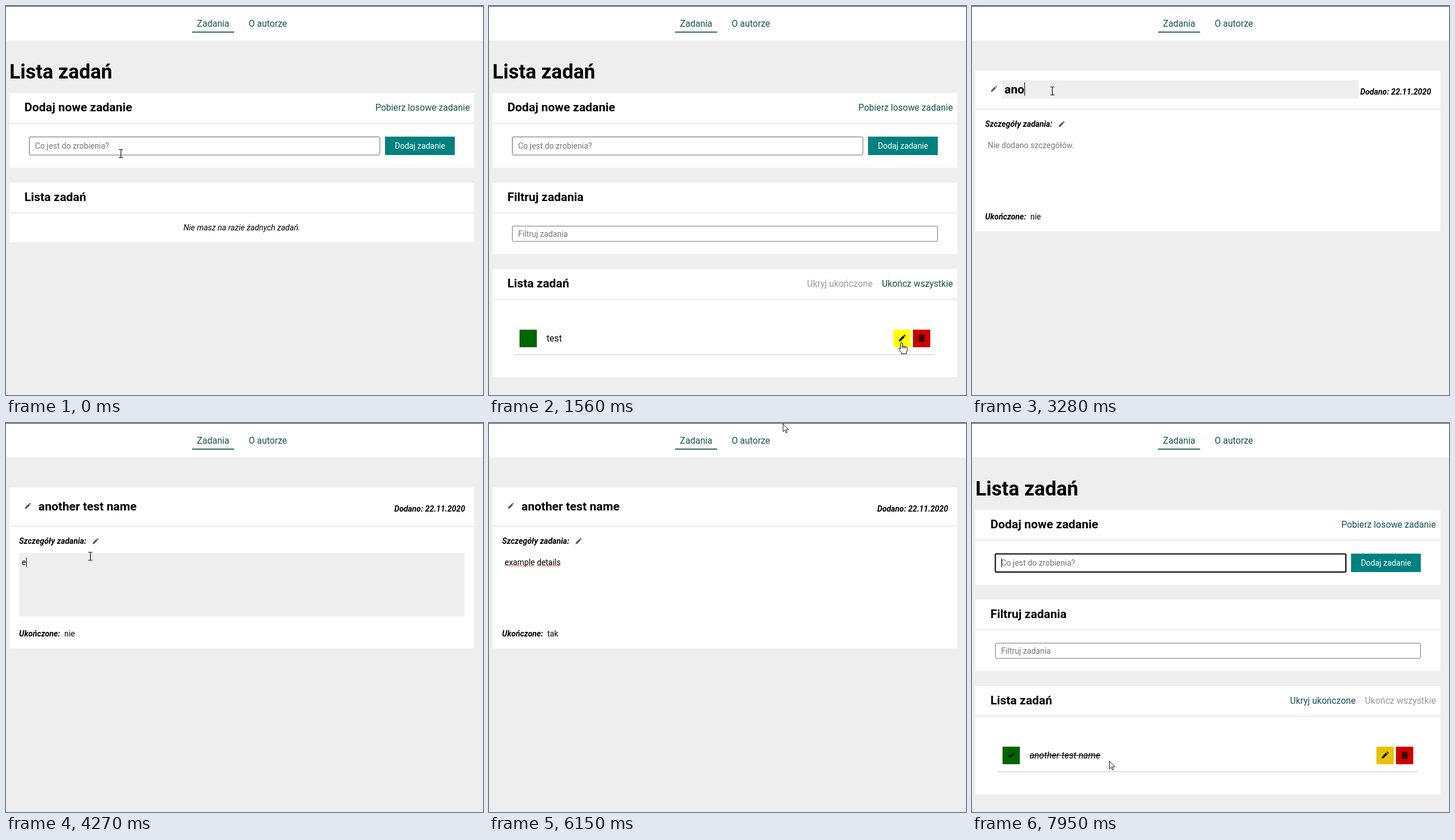
An HTML page for the animation above (8 s loop, 828 px wide and 676 px high).

```html
<!DOCTYPE html>
<html lang="pl">
<head>
<meta charset="utf-8">
<title>Lista zadań</title>
<style>
html, body { margin: 0; width: 100%; height: 100%; overflow: hidden; background: #eee; }
svg { display: block; width: 100vw; height: 100vh; font-family: Roboto, Arial, sans-serif; font-size: 13.87px; }
.h1 { font-size: 34.67px; font-weight: 700; }
.h2 { font-size: 20.8px; font-weight: 700; }
.link { font-size: 15.6px; fill: #14504f; }
.off { fill: #999; }
.item { font-size: 15.6px; }
.hint { fill: #757575; }
.label { font-weight: 700; font-style: italic; }
.end { text-anchor: end; }
.it { font-style: italic; }
</style>
</head>
<body>
<svg id="stage" viewBox="0 0 828 676" xmlns="http://www.w3.org/2000/svg"></svg>
<script>
const LOOP = 8000;
const stage = document.getElementById('stage');

const box = (x, y, x2, y2, fill = '#fff', extra = '') =>
  `<rect x="${x}" y="${y}" width="${x2 - x}" height="${y2 - y}" fill="${fill}" ${extra}/>`;
const text = (x, y, cls, str, id = '') =>
  `<text x="${x}" y="${y}" class="${cls}" ${id && `id="${id}"`}>${str}</text>`;
const group = (id, body) => `<g id="${id}">${body}</g>`;
const at = (x, y, body) => `<g transform="translate(${x} ${y})">${body}</g>`;
const panel = (top, split, bottom) => box(6, top, 813, split) + box(6, split + 2.5, 813, bottom);

const pencil = fill => `<path fill="${fill}" d="M-5.7 5.7L-4.9 2.3L1.9-4.5L4.5-1.9L-2.3 4.9Z
  M2.7-5.3L3.5-6.1Q4.1-6.6 4.7-6L6-4.7Q6.6-4.1 6.1-3.5L5.3-2.7Z"/>`;
const trash = `<path d="M-5.5-4.8H-2V-6.2H2V-4.8H5.5V-3H-5.5ZM-4.6-2.2H4.6V6.2H-4.6Z"/>
  <path d="M-2.2-.8V4.8M0-.8V4.8M2.2-.8V4.8" stroke="#c00" stroke-width=".9"/>`;
const check = '<path d="M-5.3 0L-1.8 3.4L5.4-3.7" fill="none" stroke="#000" stroke-width="2.3"/>';

const wave = (x, x2) => {
  let d = `M${x} 249`;
  for (let i = 1; x + i * 2 <= x2; i++) d += `L${x + i * 2} ${i % 2 ? 247.3 : 249}`;
  return `<path d="${d}" fill="none" stroke="#e22" stroke-width=".9"/>`;
};

const cursors = {
  I: '<path d="M-3.5-7H-1Q0-7 0-6Q0-7 1-7H3.5M0-6V6M-3.5 7H-1Q0 7 0 6Q0 7 1 7H3.5" fill="none" stroke="#000" stroke-width="1.1"/>',
  A: '<path d="M.5.5V14L3.6 11.2L5.7 16L7.7 15.1L5.6 10.4H10Z" fill="#fff" stroke="#000" stroke-width=".9"/>',
  H: `<path d="M-1.6 1Q0-.8 1.6 1V6.2Q3 5.2 4.2 6.6Q5.8 5.8 6.8 7.3Q8.8 6.6 10 8.6V13Q9.8 15 8.6 17V19.3H-.2V17.5Q-3 14-4.5 11.2Q-4.8 9-3 9.2L-1.6 10.6Z
    M1.6 6.2V10M4.2 6.6V10M6.8 7.3V10" fill="#fff" stroke="#000" stroke-width="1"/>`
};

stage.innerHTML =
  box(0, 0, 828, 676, '#eee') + box(0, 0, 828, 60) + box(0, 0, 828, 1, '#3a3a3a') +
  text(331.6, 36, 'link', 'Zadania', 'nav') + box(323, 44.5, 396, 46.3, '#14504f', 'id="navLine"') +
  text(421.2, 36, 'link', 'O autorze') +
  group('listPage',
    text(6, 126, 'h1', 'Lista zadań') +
    panel(151, 202.5, 281) +
    text(32, 183, 'h2', 'Dodaj nowe zadanie') +
    text(805.2, 182, 'link end', 'Pobierz losowe zadanie') +
    box(40.5, 227.5, 649, 259, '#fff', 'id="field" rx="1.5"') +
    text(50.5, 247.5, '', '', 'task') +
    box(658, 227, 779, 259, '#008080') +
    '<g fill="#fff">' + text(675, 247.5, '', 'Dodaj zadanie') + '</g>' +
    group('empty',
      panel(307, 358.3, 410.5) +
      text(32, 338.5, 'h2', 'Lista zadań') +
      text(308, 390, 'it', 'Nie masz na razie żadnych zadań.')) +
    group('full',
      panel(307, 358.3, 431) +
      text(32, 338.5, 'h2', 'Filtruj zadania') +
      box(40.5, 382.5, 778.5, 409, '#fff', 'rx="1.5" stroke="#767676"') +
      text(50.5, 400.5, 'hint', 'Filtruj zadania') +
      panel(457, 508.5, 645) +
      text(32, 489, 'h2', 'Lista zadań') +
      text(666, 488, '', 'Ukryj ukończone', 'hide') +
      text(805.2, 488, '', 'Ukończ wszystkie', 'finish') +
      box(53, 562.5, 83, 593, '#006400') +
      at(68, 577, group('tick', check)) +
      text(100, 582.5, '', '', 'item') +
      box(100, 577, 223, 578, '#000', 'id="strike"') +
      box(702, 562.5, 732, 593, '', 'id="edit"') + at(717, 577.3, pencil('#111')) +
      box(736, 562.5, 766, 593, '#c00') + at(751, 577.3, trash) +
      box(44, 605, 774, 606.8, '#ddd'))) +
  group('detailPage',
    panel(112, 178, 391.5) +
    at(37.8, 144.2, `<g transform="scale(.87)">${pencil('#555')}</g>`) +
    box(52.5, 129, 671, 161, '#eee', 'id="titleBg"') +
    text(56.3, 152, 'h2', '', 'title') +
    text(797, 154, 'label end', 'Dodano: 22.11.2020') +
    text(22.8, 210, 'label', 'Szczegóły zadania:') +
    at(155.2, 205.5, `<g transform="scale(.87)">${pencil('#555')}</g>`) +
    box(23, 226, 796, 336, '#eee', 'id="notesBg"') +
    text(27.3, 246.5, '', '', 'notes') +
    group('waves', wave(27.5, 79) + wave(83, 124)) +
    text(22.8, 370.5, 'label', 'Ukończone:') +
    text(101.3, 370.5, '', '', 'state')) +
  box(0, 0, 1, 1, '#000', 'id="caret"') +
  '<circle id="glow" r="10" fill="#ffe92e" opacity=".75" style="mix-blend-mode:multiply"/>' +
  group('pointer', '');

const ui = {};
stage.querySelectorAll('[id]').forEach(e => ui[e.id] = e);

// [time, x, y, shape]
const path = [
  [0, 199, 256, 'I'], [76, 199, 256, 'I'], [77, 199, 248, 'I'], [640, 199, 248, 'A'],
  [850, 370, 330, 'A'], [1232, 690, 618, 'A'], [1386, 702, 607, 'A'], [1463, 716, 585, 'H'],
  [1700, 716, 585, 'A'], [1848, 146, 126, 'A'], [1999, 146, 126, 'A'], [2000, 151, 137, 'I'],
  [2150, 151, 137, 'I'], [2233, 143, 147, 'I'], [2694, 143, 147, 'I'], [2695, 139, 147, 'I'],
  [3650, 139, 147, 'I'], [3773, 146, 231, 'I'], [4600, 146, 231, 'A'], [4697, 125, 376, 'A'],
  [4774, 114, 367, 'H'], [5520, 114, 367, 'A'], [5850, 320, 150, 'A'], [6083, 510, 1, 'A'],
  [6237, 376, 40, 'H'], [6314, 368, 35, 'H'], [6860, 368, 35, 'A'], [7700, 214, 591, 'A'],
  [7774, 214, 591, 'A'], [7775, 69, 577, 'H'], [7926, 69, 577, 'H'], [7927, 238, 587, 'A'],
  [LOOP, 238, 587, 'A']
];
const taskKeys = [[0, ''], [300, 't'], [380, 'te'], [550, 'tes'], [630, 'test'], [780, '']];
const titleKeys = [
  [0, 'test'], [2720, 'te'], [2800, ''], [2950, 'a'], [3020, 'an'], [3280, 'ano'], [3430, 'anot'],
  [3510, 'anothe'], [3580, 'another te'], [3660, 'another test na'], [3740, 'another test name']
];
const notesKeys = [
  [0, ''], [4270, 'e'], [4500, 'ex'], [4670, 'exampl'], [4750, 'example deta'], [4830, 'example details']
];
const clicks = [[230, 310], [1640, 1720], [2260, 2410], [3820, 3890], [5150, 5230], [6460, 6540]];

const within = (t, a, b) => t >= a && t < b;
const last = (keys, t) => keys.reduce((k, next) => next[0] <= t ? next : k);
const show = (el, on) => el.style.display = on ? '' : 'none';
const write = (el, str, cls) => { el.textContent = str; el.setAttribute('class', cls); };

function placeCaret(t, since, el, str, top, height) {
  const on = (t - since) % 1000 < 500;
  show(ui.caret, on);
  const x = +el.getAttribute('x') + (str ? el.getComputedTextLength() : 0);
  ui.caret.setAttribute('x', Math.round(x));
  ui.caret.setAttribute('y', top);
  ui.caret.setAttribute('height', height);
}

function pointerAt(t) {
  const q = Math.floor(t / 77) * 77;
  const i = path.findIndex(k => k[0] > q) - 1;
  const [t0, x0, y0, shape] = path[i];
  const [t1, x1, y1] = path[i + 1];
  const f = (q - t0) / (t1 - t0);
  return { x: Math.round(x0 + (x1 - x0) * f), y: Math.round(y0 + (y1 - y0) * f), shape };
}

function render(t) {
  const onDetail = within(t, 1720, 6540);
  const done = t >= 5230;
  show(ui.listPage, !onDetail);
  show(ui.detailPage, onDetail);
  show(ui.caret, false);

  const navColor = within(t, 6300, 6930) ? '#23908c' : '#14504f';
  ui.nav.style.fill = navColor;
  ui.navLine.setAttribute('fill', navColor);

  if (onDetail) {
    const [titleTime, title] = last(titleKeys, t);
    const [notesTime, notes] = last(notesKeys, t);
    const editTitle = within(t, 2180, 3820);
    const editNotes = within(t, 3820, 5080);
    write(ui.title, title, 'h2');
    write(ui.notes, notes || 'Nie dodano szczegółów.', notes ? '' : 'hint');
    show(ui.titleBg, editTitle);
    show(ui.notesBg, editNotes);
    show(ui.waves, t >= 4830);
    write(ui.state, done ? 'tak' : 'nie', '');
    ui.state.style.fontWeight = within(t, 5000, 5550) ? 500 : 400;
    if (editTitle) placeCaret(t, Math.max(titleTime, 2180), ui.title, title, 133, 23);
    if (editNotes) placeCaret(t, Math.max(notesTime, 3820), ui.notes, notes, 234, 16);
  } else {
    const [taskTime, task] = last(taskKeys, t);
    const focused = within(t, 150, 1540) || t >= 6540;
    write(ui.task, task || 'Co jest do zrobienia?', task ? '' : 'hint');
    ui.field.setAttribute('stroke', focused ? '#000' : '#666');
    ui.field.setAttribute('stroke-width', focused ? 2 : 1);
    show(ui.empty, t < 780);
    show(ui.full, t >= 780);
    write(ui.hide, 'Ukryj ukończone', 'link end' + (done ? '' : ' off'));
    write(ui.finish, 'Ukończ wszystkie', 'link end' + (done ? ' off' : ''));
    write(ui.item, done ? 'another test name' : 'test', done ? 'item it' : 'item');
    show(ui.tick, done);
    show(ui.strike, done);
    ui.edit.setAttribute('fill', within(t, 1463, 1720) ? '#ff0' : '#e6c300');
    if (focused) placeCaret(t, t >= 6540 ? 6540 : Math.max(taskTime, 150), ui.task, task, 235, 16);
  }

  const { x, y, shape } = pointerAt(t);
  if (ui.pointer.dataset.shape !== shape) {
    ui.pointer.dataset.shape = shape;
    ui.pointer.innerHTML = cursors[shape];
  }
  // the text beam sits on pixel centres
  const shift = shape === 'I' ? 0.5 : 0;
  ui.pointer.setAttribute('transform', `translate(${x + shift} ${y + shift})`);
  ui.glow.setAttribute('transform', `translate(${x} ${y})`);
  show(ui.glow, clicks.some(([a, b]) => within(t, a, b)));
}

const start = performance.now();
function frame() {
  render((performance.now() - start) % LOOP);
  requestAnimationFrame(frame);
}
frame();
</script>
</body>
</html>
```
